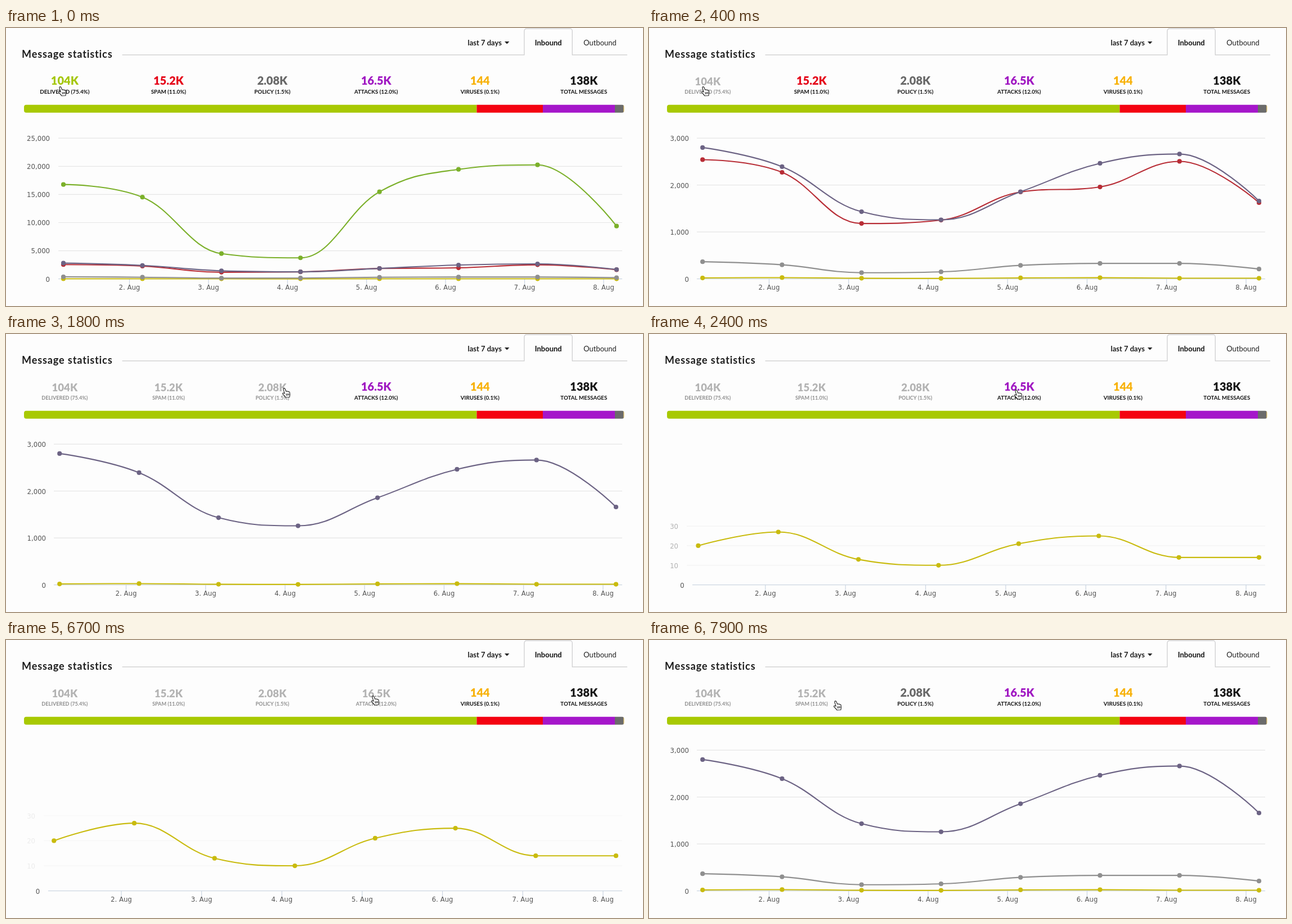
Recreate the animation shown at these times as an HTML page with a canvas. Size 1132 by 495 pixels, loop 8 s.

```html
<!DOCTYPE html>
<html lang="en">
<head>
<meta charset="utf-8">
<title>Message statistics</title>
<style>
  html, body { margin: 0; width: 100%; height: 100%; overflow: hidden; background: #fdfdfd; }
  canvas { display: block; }
</style>
</head>
<body>
<canvas id="stage" width="1132" height="495"></canvas>
<script>
const ctx = document.getElementById('stage').getContext('2d');
const LOOP = 8000, STEP = 100;
const BASE = 446.7, TOP = 186, RIGHT = 1095;
const LATO = 'Lato, sans-serif', AXIS = '11.7px "DejaVu Sans", sans-serif';

// k: pixels per unit, first/last: outer points, label: right edge of axis labels
const scales = [
  { k: 0.01002, first: 102, last: 1085, label: 78, grid: 93, step: 5000, max: 25000 },
  { k: 0.0835, first: 95.2, last: 1084, label: 71, grid: 85, step: 1000, max: 3000 },
  { k: 7.87, first: 77.5, last: 1084, label: 52, grid: 67, step: 10, max: 30 }
];
const zooms = [[8, 0, 1], [2308, 1, 2], [6608, 2, 1]];

const series = {
  delivered: { color: '#7bb02a', data: [16770, 14520, 4490, 3740, 15470, 19460, 20260, 9380] },
  viruses: { color: '#c9bb0e', data: [20, 27, 13, 10, 21, 25, 14, 14] },
  policy: { color: '#8f8f8f', data: [366, 300, 132, 150, 288, 330, 330, 210] },
  spam: { color: '#b82d36', data: [2542, 2272, 1181, 1253, 1853, 1960, 2506, 1625] },
  attacks: { color: '#6c6384', data: [2800, 2392, 1433, 1259, 1858, 2464, 2662, 1661] }
};
const clicks = [
  [8, 'delivered', 0], [1208, 'spam', 0], [1608, 'policy', 0],
  [2308, 'attacks', 0], [6608, 'attacks', 1], [7508, 'policy', 1]
];
const counters = [
  ['delivered', '104K', 'DELIVERED (75.4%)', '#a5c70c'],
  ['spam', '15.2K', 'SPAM (11.0%)', '#e5061a'],
  ['policy', '2.08K', 'POLICY (1.5%)', '#686868'],
  ['attacks', '16.5K', 'ATTACKS (12.0%)', '#a018c2'],
  ['viruses', '144', 'VIRUSES (0.1%)', '#f8b20a'],
  ['total', '138K', 'TOTAL MESSAGES', '#151515']
];
const pointer = [
  [0, 93, 104], [900, 93, 104], [1200, 280, 101], [1300, 280, 101], [1600, 491, 96],
  [1900, 491, 96], [2300, 649, 99], [6800, 649, 99], [7200, 543, 96],
  [7400, 482, 99], [7600, 482, 99], [7900, 328, 108]
];
const hand = new Path2D('M2 3Q1.6 .8 3.2 .6Q4.6 .5 5.2 2.2L6.7 6.2Q8.2 5.1 9 6.4Q10.5 5.5 11.2 7' +
  'Q12.8 6.5 13.2 8.2Q14.4 12 12.8 16.5L5.8 16.8Q4.5 14 1 11.2Q-.1 9.2 1.8 9L4.2 10Z' +
  'M7 10.2L7.6 13.8M9.2 10L9.8 13.6M11.3 9.8L11.8 13.2');

const clamp = v => Math.min(1, Math.max(0, v));
const mix = (a, b, p) => a + (b - a) * p;
const swing = p => 0.5 - Math.cos(p * Math.PI) / 2;

function text(str, x, y, font, color, align = 'left', spacing = 0) {
  ctx.font = font;
  ctx.fillStyle = color;
  ctx.textAlign = align;
  ctx.letterSpacing = spacing + 'px';
  ctx.fillText(str, x, y);
}

function line(x1, y1, x2, y2, color, width = 1) {
  ctx.strokeStyle = color;
  ctx.lineWidth = width;
  ctx.beginPath();
  ctx.moveTo(x1, y1);
  ctx.lineTo(x2, y2);
  ctx.stroke();
}

function faded(alpha, draw) {
  if (alpha <= 0) return;
  ctx.save();
  ctx.globalAlpha *= alpha;
  draw();
  ctx.restore();
}

function drawHeader() {
  text('Message statistics', 28, 53.3, `700 18px ${LATO}`, '#1c1c1c', 'left', 0.9);
  text('last 7 days', 820.5, 30.5, `700 13px ${LATO}`, '#1c1c1c');
  text('Inbound', 963.7, 30.5, `700 13px ${LATO}`, '#111', 'center');
  text('Outbound', 1055.5, 30.5, `400 13px ${LATO}`, '#222', 'center');
  ctx.beginPath();
  ctx.moveTo(886, 24);
  ctx.lineTo(894.5, 24);
  ctx.lineTo(890.2, 28.5);
  ctx.fill();

  ctx.strokeStyle = '#cbcbcd';
  ctx.lineWidth = 1.2;
  ctx.beginPath();
  ctx.moveTo(206.5, 47.8);
  ctx.lineTo(921, 47.8);
  ctx.arcTo(921, 1.2, 930, 1.2, 4);
  ctx.arcTo(1006.3, 1.2, 1006.3, 10, 4);
  ctx.lineTo(1006.3, 47.8);
  ctx.lineTo(1104, 47.8);
  ctx.stroke();
}

function enabled(name, t, delay, time) {
  let on = 1;
  for (const [at, id, to] of clicks) {
    if (id === name && t >= at + delay) {
      on = mix(on, to, time ? clamp((t - at - delay) / time) : 1);
    }
  }
  return on;
}

function drawCounters(t) {
  counters.forEach(([id, value, label, color], i) => {
    const on = enabled(id, t, 92, 100);
    const draw = (main, sub) => {
      text(value, 0, -16, `900 20px ${LATO}`, main, 'center');
      text(label, 0, -0.4, `700 9.8px ${LATO}`, sub, 'center');
    };
    ctx.save();
    ctx.translate(104.3 + i * 184.5, 117);
    ctx.scale(mix(0.93, 1, on), mix(0.93, 1, on));
    faded(1 - on, () => draw('#b3b3b3', '#8e8e8e'));
    faded(on, () => draw(color, '#111'));
    ctx.restore();
  });
}

function drawBar() {
  const stops = [32, 836.5, 954, 1082, 1097.6, 1098.6];
  const colors = ['#a8c903', '#f40311', '#a516ca', '#6b6b6b', '#e5b021'];
  ctx.save();
  ctx.beginPath();
  ctx.roundRect(32, 136.8, 1066.6, 14, 4);
  ctx.clip();
  colors.forEach((c, i) => {
    ctx.fillStyle = c;
    ctx.fillRect(stops[i], 136, stops[i + 1] - stops[i], 16);
  });
  ctx.restore();
}

function drawGrid(scale, k, lineAlpha, labelAlpha) {
  for (let v = scale.step; v <= scale.max; v += scale.step) {
    const y = BASE - v * k;
    if (y < TOP) break;
    faded(lineAlpha, () => line(scale.grid, y, RIGHT, y, '#e6e6e6', 1.2));
    faded(labelAlpha, () => text(v.toLocaleString('en-US'), scale.label, y + 4.8, AXIS, '#555', 'right'));
  }
}

// Smooth curve whose control points never overshoot their neighbours.
function spline(pts) {
  ctx.beginPath();
  ctx.moveTo(pts[0].x, pts[0].y);
  let out = pts[0];
  for (let i = 1; i < pts.length; i++) {
    const a = pts[i - 1], b = pts[i], c = pts[i + 1];
    let left = b, right = b;
    if (c) {
      const lx = (1.5 * b.x + a.x) / 2.5, rx = (1.5 * b.x + c.x) / 2.5;
      let ly = (1.5 * b.y + a.y) / 2.5, ry = (1.5 * b.y + c.y) / 2.5;
      const fix = (ry - ly) * (rx - b.x) / (rx - lx) + b.y - ry;
      ly += fix;
      ry += fix;
      const bound = (y, n) => Math.min(Math.max(y, Math.min(n, b.y)), Math.max(n, b.y));
      const l2 = bound(ly, a.y);
      if (l2 !== ly) { ly = l2; ry = 2 * b.y - ly; }
      const r2 = bound(ry, c.y);
      if (r2 !== ry) { ry = r2; ly = 2 * b.y - ry; }
      left = { x: lx, y: ly };
      right = { x: rx, y: ry };
    }
    ctx.bezierCurveTo(out.x, out.y, left.x, left.y, b.x, b.y);
    out = right;
  }
  ctx.stroke();
}

function drawSeries({ color, data }, k, xAt) {
  const pts = data.map((v, i) => ({ x: xAt(i), y: BASE - v * k }));
  ctx.strokeStyle = ctx.fillStyle = color;
  ctx.lineWidth = 2.1;
  spline(pts);
  for (const { x, y } of pts) {
    ctx.beginPath();
    ctx.arc(x, y, 4.1, 0, 7);
    ctx.fill();
  }
}

function drawChart(t) {
  let from = scales[0], to = from, p = 0;
  for (const [at, a, b] of zooms) {
    if (t >= at) {
      from = scales[a];
      to = scales[b];
      p = swing(clamp((t - at) / 200));
    }
  }
  const now = key => mix(from[key], to[key], p);
  const k = now('k'), first = now('first'), gap = (now('last') - first) / 7;
  const xAt = i => first + i * gap;

  drawGrid(from, k, (1 - p) ** 2, (1 - p) ** 4);
  if (p > 0) drawGrid(to, k, p, p);

  line(now('grid'), BASE, RIGHT, BASE, '#ccd6e2', 1.2);
  text('0', now('label'), BASE + 4.8, AXIS, '#555', 'right');
  for (let i = 1; i < 8; i++) {
    const x = xAt(i) - 23;
    line(x, BASE, x, BASE + 10, '#ccd6e2', 1.2);
    text(`${i + 1}. Aug`, x, 466.3, AXIS, '#555', 'center');
  }

  ctx.save();
  ctx.beginPath();
  ctx.rect(0, TOP, 1132, 309);
  ctx.clip();
  for (const id in series) {
    if (enabled(id, t, 0, 0)) drawSeries(series[id], k, xAt);
  }
  ctx.restore();
}

function drawPointer(t) {
  let i = pointer.length - 1;
  while (pointer[i][0] > t) i--;
  const a = pointer[i], b = pointer[i + 1] || a;
  const p = b === a ? 0 : swing((t - a[0]) / (b[0] - a[0]));
  ctx.save();
  ctx.translate(mix(a[1], b[1], p), mix(a[2], b[2], p));
  ctx.lineJoin = 'round';
  ctx.fillStyle = '#fff';
  ctx.strokeStyle = '#222';
  ctx.lineWidth = 1.1;
  ctx.fill(hand);
  ctx.stroke(hand);
  ctx.restore();
}

function render(t) {
  ctx.fillStyle = '#fdfdfd';
  ctx.fillRect(0, 0, 1132, 495);
  drawHeader();
  drawCounters(t);
  drawBar();
  drawChart(t);
  drawPointer(t);
}

const start = performance.now();
function tick() {
  const t = (performance.now() - start) % LOOP;
  render(Math.floor(t / STEP) * STEP);
  requestAnimationFrame(tick);
}
tick();
</script>
</body>
</html>
```
